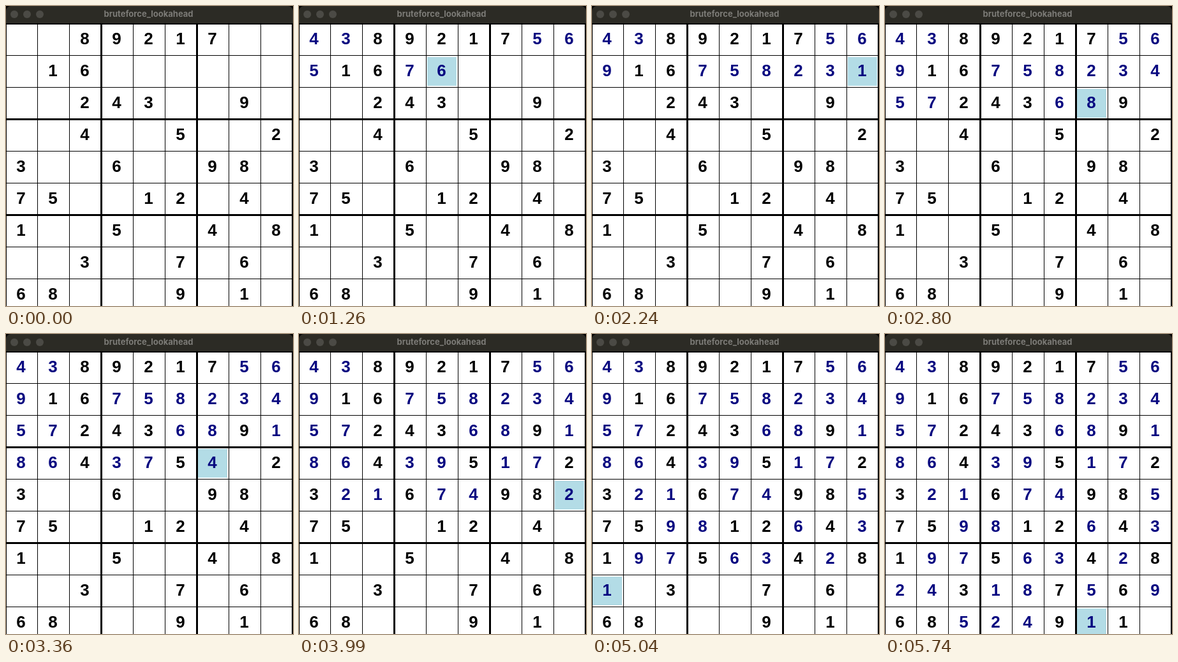
An HTML page with a canvas for the animation above (5.81 s loop, 450 by 470 pixels).

```html
<!DOCTYPE html>
<html lang="en">
<head>
<meta charset="utf-8">
<title>bruteforce_lookahead</title>
<style>
html, body { margin: 0; width: 100%; height: 100%; overflow: hidden; background: #000; }
canvas { display: block; }
</style>
</head>
<body>
<canvas id="stage" width="450" height="470"></canvas>
<script>
const ctx = document.getElementById('stage').getContext('2d');
const LOOP = 5810, TICK = 70, CELL = 50, TOP = 27.5;

const puzzle = [
  '..89217..', '.16......', '..243..9.',
  '..4..5..2', '3..6..98.', '75..12.4.',
  '1..5..4.8', '..3..7.6.', '68...9.1.'
].join('').split('').map(ch => ch === '.' ? 0 : +ch);

// Ticks paired with the number of digits tried so far; linear in between.
const pace = [[10, 0], [11, 5], [14, 18], [15, 24], [18, 36], [32, 98],
  [48, 174], [57, 214], [64, 249], [72, 280], [82, 320]];

const boxOf = i => Math.floor(i / 27) * 3 + Math.floor(i % 9 / 3);

function fits(grid, cell, digit) {
  return grid.every((d, i) => d !== digit || i === cell ||
    (i % 9 !== cell % 9 && Math.floor(i / 9) !== Math.floor(cell / 9) && boxOf(i) !== boxOf(cell)));
}

// Plain backtracking that records the board at every try.
function recordTries() {
  const grid = puzzle.slice();
  const tries = [{ grid: grid.slice(), cell: -1 }];
  const solve = () => {
    const cell = grid.indexOf(0);
    if (cell < 0) return true;
    for (let digit = 1; digit <= 9; digit++) {
      grid[cell] = digit;
      tries.push({ grid: grid.slice(), cell });
      if (fits(grid, cell, digit) && solve()) return true;
    }
    grid[cell] = 0;
    return false;
  };
  solve();
  return tries;
}

const tries = recordTries();

function tryAt(tick) {
  if (tick <= pace[0][0]) return 0;
  const k = pace.findIndex(p => p[0] >= tick);
  const [t0, n0] = pace[k - 1], [t1, n1] = pace[k];
  return Math.round(n0 + (n1 - n0) * (tick - t0) / (t1 - t0));
}

function drawTitleBar() {
  ctx.fillStyle = '#000';
  ctx.fillRect(0, 0, 450, 29);
  ctx.fillStyle = '#2c2b25';
  ctx.beginPath();
  ctx.roundRect(0, 0, 450, 27, [8, 8, 0, 0]);
  ctx.fill();
  ctx.fillStyle = '#4b4a45';
  for (const x of [13, 33, 53]) {
    ctx.beginPath();
    ctx.arc(x, 13, 6, 0, Math.PI * 2);
    ctx.fill();
  }
  ctx.fillStyle = '#7c7b77';
  ctx.font = '700 13px Inter, sans-serif';
  ctx.fillText('bruteforce_lookahead', 223.5, 17);
}

function drawLines() {
  ctx.fillStyle = '#000';
  for (let i = 0; i <= 9; i++) {
    const w = i % 3 ? 1 : 3, at = i * CELL - w / 2;
    ctx.fillRect(at - 0.5, TOP, w, 470);
    ctx.fillRect(0, TOP + at, 450, w);
  }
}

function draw(tick) {
  const { grid, cell } = tries[tryAt(tick)];
  ctx.textAlign = 'center';
  ctx.fillStyle = '#fff';
  ctx.fillRect(0, 0, 450, 470);
  drawLines();
  if (cell >= 0) {
    ctx.fillStyle = '#b3dce6';
    ctx.fillRect(cell % 9 * CELL + 1, Math.floor(cell / 9) * CELL + 30, 46, 45);
  }
  ctx.font = 'bold 26px "Liberation Sans", Arial, sans-serif';
  grid.forEach((digit, i) => {
    if (!digit) return;
    ctx.fillStyle = puzzle[i] ? '#000' : '#080880';
    ctx.fillText(digit, i % 9 * CELL + 23.5, Math.floor(i / 9) * CELL + 60);
  });
  drawTitleBar();
}

function frame() {
  draw(Math.floor(performance.now() % LOOP / TICK));
  requestAnimationFrame(frame);
}
frame();
</script>
</body>
</html>
```
